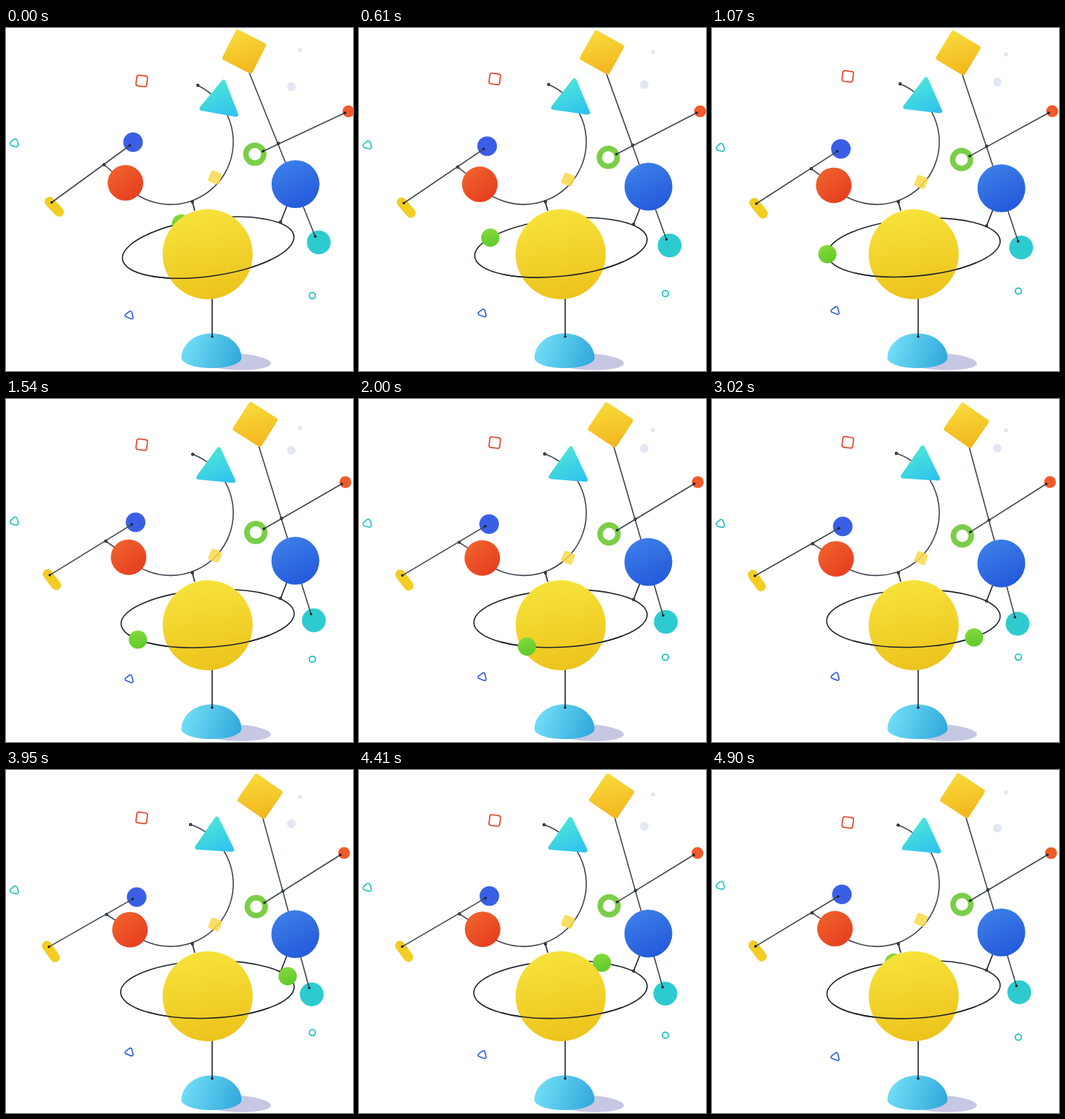
Animation, 478 px wide and 473 px high, one loop 4.97 s. Source, as an HTML page with a canvas:

```html
<!DOCTYPE html>
<html lang="en">
<head>
<meta charset="utf-8">
<title>Orrery</title>
<style>
html, body { margin: 0; overflow: hidden; background: #fff }
canvas { display: block }
</style>
</head>
<body>
<canvas id="stage" width="478" height="473"></canvas>
<script>
const c = document.getElementById('stage').getContext('2d');
const LOOP = 4970, DEG = Math.PI / 180, TAU = Math.PI * 2;
const ROD = '#3d464f', INK = '#1c222a';

// Angle of the green moon on the ring, in degrees, by time
const ORBIT = [[0, 254.3], [610, 217], [1540, 145], [2410, 86], [3020, 46.3], [3950, -21.7], [4900, -102], [LOOP, -105.7]];

function moonAngle(t) {
  const i = ORBIT.findIndex(k => k[0] > t);
  const [t0, a0] = ORBIT[i - 1], [t1, a1] = ORBIT[i];
  return (a0 + (a1 - a0) * (t - t0) / (t1 - t0)) * DEG;
}

function gradient(x0, y0, x1, y1, from, to) {
  const g = c.createLinearGradient(x0, y0, x1, y1);
  g.addColorStop(0, from);
  g.addColorStop(1, to);
  return g;
}

function ball([x, y], r, from, to = from, dx = 0.3) {
  c.fillStyle = gradient(x - r * dx, y - r, x + r * dx, y + r, from, to);
  c.beginPath();
  c.arc(x, y, r, 0, TAU);
  c.fill();
}

function hoop([x, y], r, color, width) {
  c.strokeStyle = color;
  c.lineWidth = width;
  c.beginPath();
  c.arc(x, y, r, 0, TAU);
  c.stroke();
}

function line(a, b, color = ROD, width = 1.6) {
  c.strokeStyle = color;
  c.lineWidth = width;
  c.beginPath();
  c.moveTo(...a);
  c.lineTo(...b);
  c.stroke();
}

const dot = p => ball(p, 1.8, INK);

function joint(p) {
  ball(p, 2.2, INK);
  ball(p, 0.8, '#8a9098');
}

function square([x, y], size, angle, radius, paint) {
  c.save();
  c.translate(x, y);
  c.rotate(angle * DEG);
  c.beginPath();
  c.roundRect(-size / 2, -size / 2, size, size, radius);
  paint();
  c.restore();
}

function outlineTriangle(p, q, r, radius, dy, color) {
  c.save();
  c.translate(0, dy);
  c.beginPath();
  c.moveTo((p[0] + q[0]) / 2, (p[1] + q[1]) / 2);
  c.arcTo(...q, ...r, radius);
  c.arcTo(...r, ...p, radius);
  c.arcTo(...p, ...q, radius);
  c.closePath();
  c.strokeStyle = color;
  c.lineWidth = 1.7;
  c.stroke();
  c.restore();
}

function draw(t) {
  const sway = (1 - Math.cos(4.18e-4 * (t - 3350))) / 0.83;
  const bob = 14.5 * (1 - Math.cos(Math.PI * (t - 2550) / 2800)) / 2;
  const mix = (a, b) => b + (a - b) * sway;
  const at = (ax, ay, bx, by) => [mix(ax, bx), mix(ay, by)];

  c.clearRect(0, 0, 478, 473);

  // Floating shapes
  ball([393, 66.7 + bob], 6, '#e2e7f2');
  ball([405, 44.3 - bob], 2.8, '#e2e6ee');
  square([187, 58.8 + bob], 14.8, 7, 3, () => {
    c.strokeStyle = '#e0482c';
    c.lineWidth = 1.7;
    c.stroke();
  });
  outlineTriangle([2.5, 161], [14, 150.5], [18.5, 165], 3, 14.2 - bob, '#27c2c7');
  outlineTriangle([162, 397], [172.5, 389], [176, 402.5], 2, bob - 14.2, '#3463de');
  hoop([422, 354.8 + bob], 4.2, '#27c2c7', 1.9);

  // Base
  c.fillStyle = '#c6c7e3';
  c.beginPath();
  c.ellipse(315, 460, 50, 11.5, 0.05, 0, TAU);
  c.fill();
  c.fillStyle = gradient(250, 435, 322, 460, '#6edbf5', '#32a9dc');
  c.beginPath();
  c.ellipse(283, 455, 41.5, 34, 0, Math.PI, TAU);
  c.ellipse(283, 455, 41.5, 14, 0, 0, Math.PI);
  c.fill();
  line([284, 370], [284, 425], INK);
  dot([284, 425.5]);

  // Curved arm on the left
  const red = at(164.5, 213.5, 171, 220.5), elbow = at(135, 188.5, 138.7, 199.7);
  line(elbow, red);
  c.lineWidth = 1.6;
  c.beginPath();
  c.arc(226.7, 157, 86.4, mix(-64.6, -71.5) * DEG, mix(137.9, 131.6) * DEG);
  c.stroke();
  joint(at(264.3, 79, 253.8, 75));
  line([256.8, 240], [260, 252], INK);
  joint([256.8, 239.8]);
  ball(red, 24.5, '#f0652d', '#e63a1e', 0.8);

  const [top, right, left] = [at(299.5, 74.5, 290, 67), at(317, 119.5, 311, 109.5), at(269.5, 111, 263, 106.5)];
  c.fillStyle = c.strokeStyle = gradient(...top, ...right, '#49e2da', '#2fc3ef');
  c.lineWidth = 6;
  c.lineJoin = 'round';
  c.beginPath();
  c.moveTo(...top);
  c.lineTo(...right);
  c.lineTo(...left);
  c.closePath();
  c.fill();
  c.stroke();

  square([288, 220.3 - bob], 16, 22, 3, () => {
    c.fillStyle = 'rgba(250, 217, 75, .86)';
    c.fill();
  });

  const barStart = at(63, 240.5, 59, 244), barEnd = at(170.5, 162, 174.7, 178.5);
  ball(at(175, 157.5, 180.2, 176), 13.5, '#3a5fe6');
  c.lineCap = 'round';
  line(at(60, 239.5, 56, 242.5), at(73, 253.5, 67.3, 258.5), '#f3cd22', 13.4);
  c.lineCap = 'butt';
  line(barStart, barEnd);
  [barStart, barEnd].forEach(dot);
  joint(elbow);

  // Ring, moon and planet
  const tilt = -mix(7.8, 1.7) * DEG, cx = mix(278.5, 277.4), cy = 302.8;
  const rx = mix(119.2, 119.6), ry = 39.5;
  const ring = (from, to) => {
    c.strokeStyle = INK;
    c.lineWidth = 1.6;
    c.beginPath();
    c.ellipse(cx, cy, rx, ry, tilt, from, to);
    c.stroke();
  };
  const hinge = at(378.2, 267.5, 378.2, 278.6), blue = at(398.8, 215.3, 398.5, 226.8);
  ring(0, TAU);
  line(hinge, blue, INK);
  joint(hinge);

  const a = moonAngle(t), mx = rx * Math.cos(a), my = ry * Math.sin(a);
  const moon = () => ball([
    cx + mx * Math.cos(tilt) - my * Math.sin(tilt),
    cy + mx * Math.sin(tilt) + my * Math.cos(tilt)
  ], 12.6, '#85d83b', '#5fca2c');
  const behind = my < 0;
  if (behind) moon();
  ball([277.8, 312], 62, '#f7e33b', '#ecc31c', 0.2);
  ring(0.8, 2.34);
  if (!behind) moon();

  // Tall mobile on the right
  const foot = at(426, 287.5, 417.3, 301);
  ball(at(430.8, 295.6, 420.8, 310), 16.4, '#2dcbcf');
  line(at(330, 49, 350.7, 52), foot);
  dot(foot);
  ball(blue, 33, '#3d80e9', '#2358da', 0.5);
  square(at(328, 32.5, 350.7, 36.3), 46.5, mix(27, 35), 3.5, () => {
    c.fillStyle = gradient(-20, -20, 20, 20, '#f8d938', '#f3b71f');
    c.fill();
  });

  const crossStart = at(354, 170, 356, 183.5), crossEnd = at(467, 117, 460.5, 117);
  hoop(at(342.8, 174, 344.8, 189), 12.3, '#7bce48', 7.6);
  ball(at(471.7, 115, 465.5, 114.5), 8.2, '#f15b2a');
  line(crossStart, crossEnd);
  [crossStart, crossEnd].forEach(dot);
  joint(at(375, 159, 381.7, 167.2));
}

function tick() {
  draw(performance.now() % LOOP);
  requestAnimationFrame(tick);
}
tick();
</script>
</body>
</html>
```
